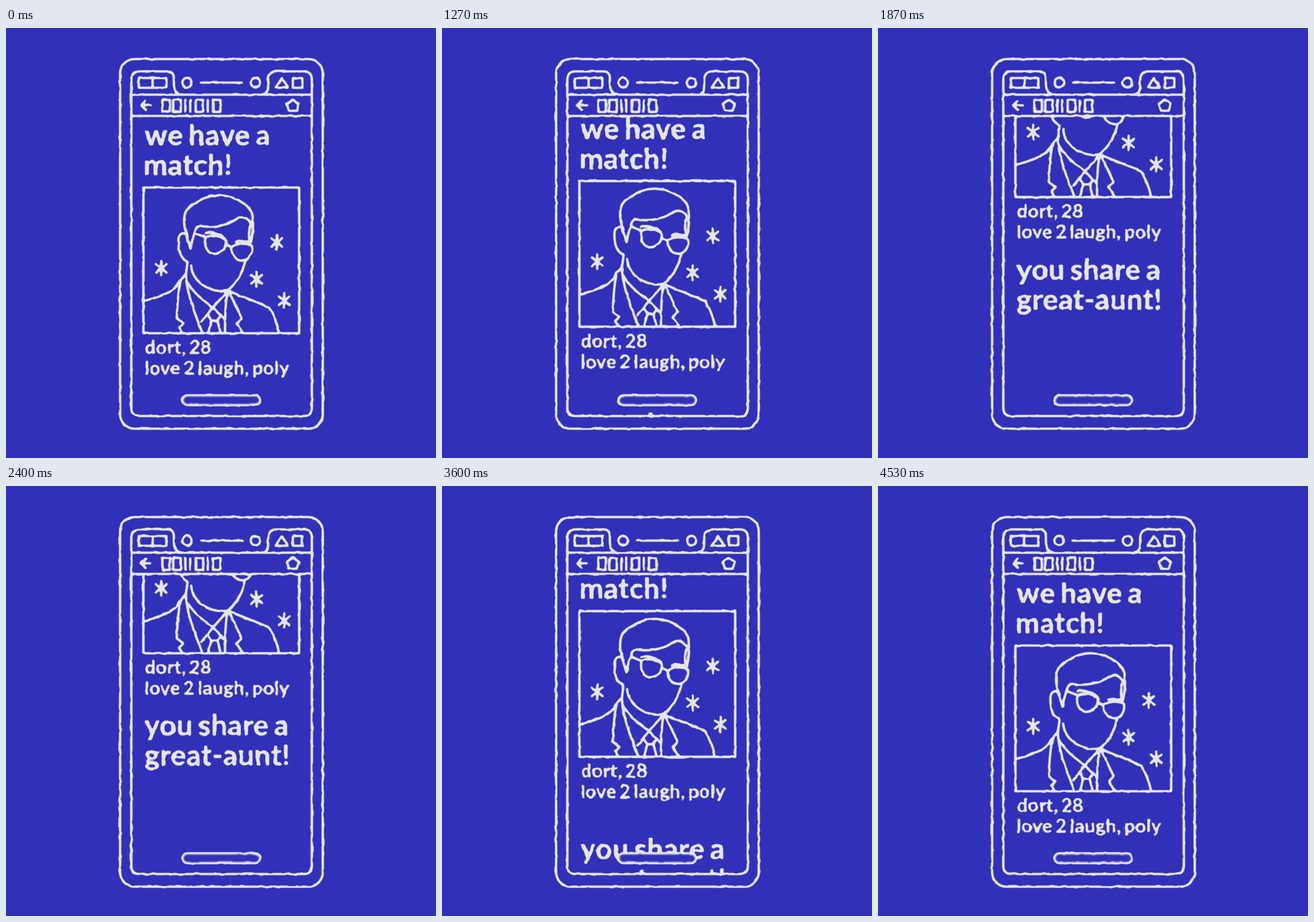
Write an HTML page that moves like this. It is 748 px wide and 748 px high and loops after 4740 ms.

```html
<!DOCTYPE html>
<html lang="en">
<head>
<meta charset="utf-8">
<title>Match</title>
<style>
  html, body { margin: 0; width: 100%; height: 100%; overflow: hidden; background: #3130b8; }
  svg { display: block; width: 100vw; height: 100vh; }
  .ink { fill: none; stroke: #e5e5e5; stroke-width: 4.2; stroke-linecap: round; stroke-linejoin: round; }
  text { font: 700 50px Lato, "Open Sans", sans-serif; letter-spacing: .55px; word-spacing: -3.6px; fill: #e5e5e5; stroke-width: .7; }
  .small { font-size: 33px; letter-spacing: .35px; word-spacing: -3.1px; stroke-width: .4; }
  .solid { fill: #3130b8; }
</style>
</head>
<body>
<svg viewBox="0 0 748 748">
  <defs>
    <!-- wobble the edges, then smooth and sharpen them again -->
    <filter id="rough" filterUnits="userSpaceOnUse" x="0" y="0" width="748" height="748" color-interpolation-filters="sRGB">
      <feTurbulence id="noise" type="fractalNoise" baseFrequency=".1" numOctaves="1" seed="1" result="n"/>
      <feDisplacementMap in="SourceGraphic" in2="n" scale="3.6" xChannelSelector="R" yChannelSelector="G"/>
      <feGaussianBlur stdDeviation=".8"/>
      <feComponentTransfer><feFuncA type="linear" slope="2" intercept="-.48"/></feComponentTransfer>
    </filter>
    <clipPath id="screen"><rect x="218" y="153" width="314" height="521"/></clipPath>
    <path id="star" d="M0 -13V13M-9.5 -7.5L9.5 7.5M9.5 -7.5L-9.5 7.5"/>
  </defs>

  <rect width="748" height="748" class="solid"/>
  <g class="ink" filter="url(#rough)">
    <g clip-path="url(#screen)">
      <g id="profile">
        <text x="241" y="204">we have a</text>
        <text x="239" y="256">match!</text>
        <rect x="239" y="277.5" width="271" height="253.5"/>

        <!-- hair and ear -->
        <path d="M316 363C311 352 309 341 310 331C311 317 318 310 330 304C345 294 359 290 373 291C390 292 402 297 413 305C424 313 430 322 429 332C431 345 430 356 426 373"/>
        <path d="M315 361C308 353 299 358 300 372C300 390 305 402 316 406M314 362L321 384C323 371 326 362 329 353Q330 347 337 344C350 347 380 347 400 333C410 326 421 329 426 341C422 351 422 362 424 373"/>

        <!-- glasses -->
        <path d="M329 357L347 364C358 359 374 361 382 369C385 381 374 393 361 393C350 391 344 380 347 364M346 357C355 354 372 358 381 366M382 377Q388 378 393 382"/>
        <path d="M393 381C400 374 420 374 428 379C430 393 422 405 410 404C398 403 391 393 393 381M400 372C408 369 418 370 425 374"/>

        <!-- jaw and neck -->
        <path d="M417 403C412 424 403 443 386 456C364 463 325 447 322 413M316 406L313 428"/>

        <!-- jacket, shirt and tie -->
        <path d="M240 475C265 468 290 460 298 447C302 438 307 434 313 428M304 438C300 455 298 480 297 505L309 514L301 521L306 529"/>
        <path d="M313 428C313 452 325 490 341 528M314 440C326 461 342 473 360 486L386 457M360 486L340 511M360 486L381 508"/>
        <path d="M351 498L357 509H368L374 500M357 509L352 529M368 509L373 529M386 457Q381 475 381 529"/>
        <path d="M387 457L410 505L401 514L411 529M387 457C410 468 440 477 458 487C466 500 472 515 475 530"/>

        <use href="#star" x="270" y="418"/>
        <use href="#star" x="471" y="373"/>
        <use href="#star" x="436" y="437"/>
        <use href="#star" x="484" y="474.5"/>
        <text class="small" x="241.5" y="567">dort, 28</text>
        <text class="small" x="241" y="603">love 2 laugh, poly</text>
      </g>
      <g id="reveal">
        <text x="241" y="720">you share a</text>
        <text x="241" y="772">great-aunt!</text>
      </g>
    </g>

    <rect class="solid" x="307" y="639" width="135" height="17" rx="8.5"/>

    <!-- phone body -->
    <rect x="198.5" y="54" width="352.5" height="643" rx="25"/>
    <path d="M218 90Q218 75.5 232 75.5H281Q292 75.5 292 87V98Q293 115 307 116H444Q456 115 456 102V90Q457 76 469 75.5H518Q532 75.5 532 90V661Q532 675 518 675H232Q218 675 218 661Z"/>
    <path d="M218 116H532M218 153H532"/>

    <!-- status bar -->
    <rect x="231" y="87" width="48" height="17"/>
    <path d="M255 87V104M339 95H411M480 87L491 104H469Z"/>
    <circle cx="315" cy="95" r="8.3"/>
    <circle cx="434" cy="95" r="8.3"/>
    <rect x="499" y="87" width="16.5" height="17"/>

    <!-- title bar -->
    <path d="M252 134.5H235M243 126.5L235 134.5L243 142.5M499 124.5L509.5 132L505.5 144H492.5L488.5 132Z"/>
    <path d="M272 125H285V146H272ZM291 125H304V146H291ZM312 125V146M320.5 125V146M330 125H343V146H330ZM351 125V146M360 125H373V146H360Z"/>
  </g>
</svg>
<script>
  const LOOP = 4740, FPS = 15, HOLD = 4;
  const el = id => document.getElementById(id);
  const noise = el('noise'), profile = el('profile'), reveal = el('reveal');

  // Bezier easing with control points (.85, 0) and (.25, 1)
  function ease(x) {
    if (x <= 0) return 0;
    if (x >= 1) return 1;
    let lo = 0, hi = 1, s = .5;
    for (let i = 0; i < 24; i++) {
      s = (lo + hi) / 2;
      const r = 1 - s;
      const bx = 3 * .85 * s * r * r + 3 * .25 * s * s * r + s * s * s;
      if (bx < x) lo = s; else hi = s;
    }
    return s * s * (3 - 2 * s);
  }

  const slide = (node, y) => node.setAttribute('transform', `translate(0 ${y.toFixed(2)})`);

  let last = -1;
  function draw(time) {
    const step = Math.floor((time % LOOP + 4) * FPS / 1000);
    if (step !== last) {
      last = step;
      const scroll = ease((step - 15) / 15) - ease((step - 45) / 15);
      slide(profile, -240 * scroll);
      slide(reveal, -286 * scroll);
      noise.setAttribute('seed', 1 + Math.floor(step / HOLD));
    }
  }

  function tick() {
    draw(performance.now());
    requestAnimationFrame(tick);
  }
  tick();
</script>
</body>
</html>
```
